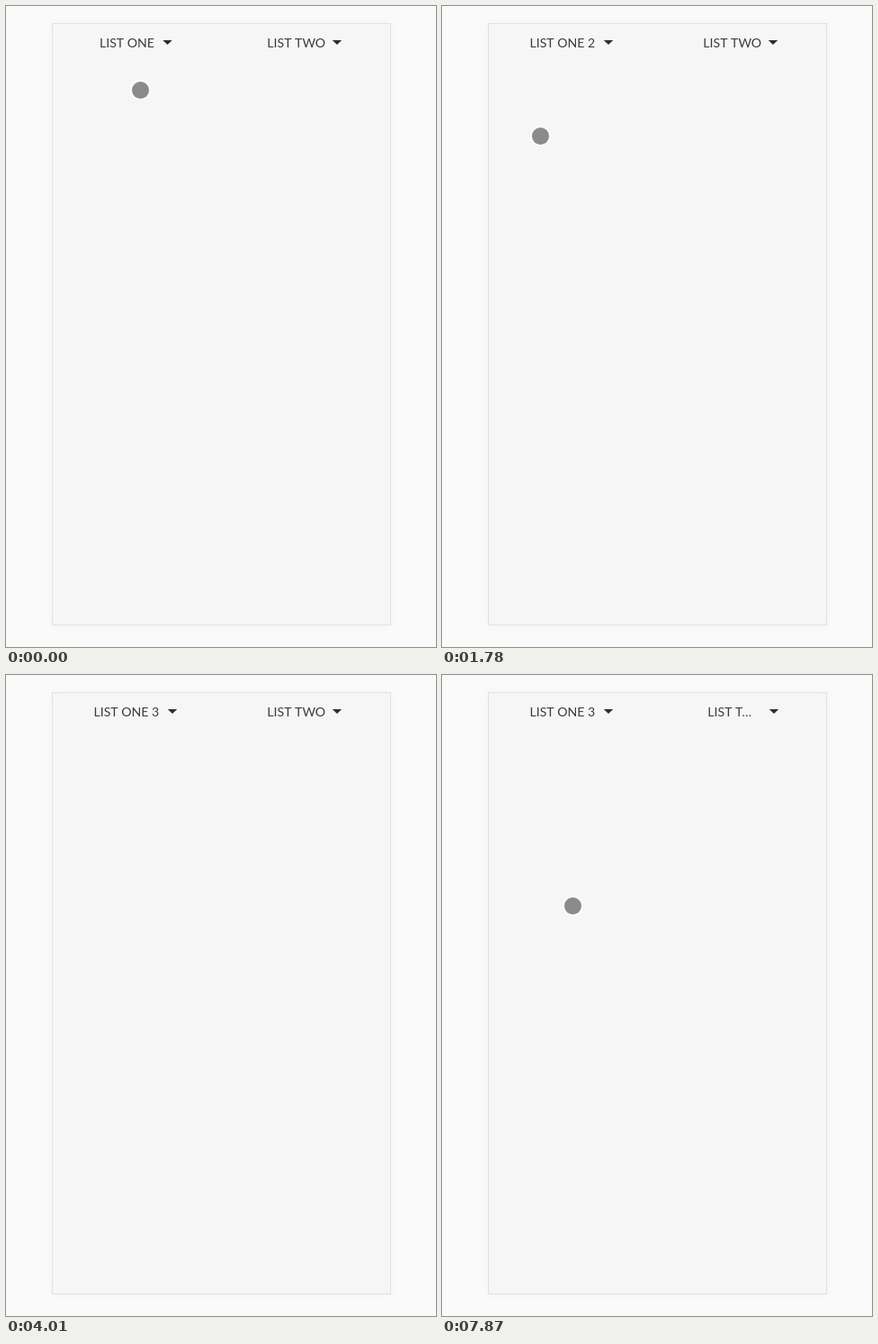
Write an HTML page with a canvas that moves like this. It is 478 by 712 pixels and loops after 8000 ms.

```html
<!DOCTYPE html>
<html lang="en">
<head>
<meta charset="utf-8">
<title>Dropdown menu</title>
<style>
  html, body { margin: 0; width: 100%; height: 100%; overflow: hidden; background: #fafafa; }
  canvas { display: block; }
</style>
</head>
<body>
<canvas id="stage" width="478" height="712"></canvas>
<script>
const ctx = document.getElementById('stage').getContext('2d');
const LOOP = 8000;
const RED = '#f3695c', INK = '#3c3c3c', ARROW = '#2f2f2f';
const FONT = '14.1px Lato, sans-serif';
const CJK = '14px "Noto Sans CJK SC", "Noto Sans CJK", sans-serif';
const PANEL = { x: 52, y: 20, w: 375, h: 667 };
const ROW = 55, LIST_TOP = 62;

// Header captions: [start, text, text x, arrow x]
const captions = [
  [[0, 'LIST ONE', 104, 179.5], [1780, 'LIST ONE 2', 97.5, 185], [3710, 'LIST ONE 3', 97.5, 185]],
  [[0, 'LIST TWO', 290.3, 368], [7870, 'LIST T…', 295.3, 369]]
];

const menus = [
  { from: 740, to: 1780, tab: 0, name: 'LIST ONE', picked: 1, tip: 146 },
  { from: 2660, to: 3710, tab: 0, name: 'LIST ONE', picked: 2, tip: 146 },
  { from: 6990, to: 7870, tab: 1, name: 'LIST TWO', picked: 2, tip: 333 }
];

// Pointer moves: [first step, last step, steps, x, y]
const moves = [
  [0, 0, 1, 149.5, 93.5],
  [150, 590, 4, 155.5, 39.5],
  [1190, 1630, 4, 109.5, 144.5],
  [1930, 2210, 3, 150, 62],
  [2360, 2510, 2, 155.5, 45.5],
  [2810, 3260, 4, 168, 186],
  [3410, 3560, 2, 170, 192],
  [3860, 3860, 1, 171, 165],
  [6110, 6110, 1, 300, 6],
  [6260, 6260, 1, 389, 195],
  [6400, 6690, 3, 309.5, 38.5],
  [7130, 7720, 5, 145.5, 256.5]
];
const hidden = t => t >= 4010 && t < 6110;

function pointerAt(t) {
  let x = 0, y = 0;
  for (const [first, last, steps, tx, ty] of moves) {
    if (t < first) break;
    const gap = (last - first) / Math.max(1, steps - 1);
    const done = gap ? Math.min(steps, Math.floor((t - first) / gap + 1e-6) + 1) : steps;
    const p = done / steps, k = p * p * (3 - 2 * p);
    x += (tx - x) * k;
    y += (ty - y) * k;
  }
  return { x, y };
}

function rect(x, y, w, h, color) {
  ctx.fillStyle = color;
  ctx.fillRect(x, y, w, h);
}

function text(str, x, y, color, font = FONT, align = 'left') {
  ctx.font = font;
  ctx.textAlign = align;
  ctx.fillStyle = color;
  ctx.fillText(str, x, y);
}

function triangle(x, base, half, height, color) {
  ctx.fillStyle = color;
  ctx.beginPath();
  ctx.moveTo(x - half, base);
  ctx.lineTo(x + half, base);
  ctx.lineTo(x, base + height);
  ctx.fill();
}

function disc(x, y, r, color) {
  ctx.fillStyle = color;
  ctx.beginPath();
  ctx.arc(x, y, r, 0, Math.PI * 2);
  ctx.fill();
}

function drawPanel() {
  const { x, y, w, h } = PANEL;
  rect(0, 0, 478, 712, '#fafafa');
  ctx.save();
  ctx.shadowColor = 'rgba(0,0,0,.03)';
  ctx.shadowBlur = 10;
  rect(x - 1, y - 1, w + 2, h + 2, '#e1e1e1');
  ctx.restore();
  rect(x, y, w, h, '#f6f6f6');
}

function drawMenu(menu) {
  const { x, y, w, h } = PANEL;
  rect(x, y, w, h, '#7a7a7a');
  rect(x, y, w, LIST_TOP - y, '#f4f4f4');
  rect(x, LIST_TOP, w, ROW * 5, '#fefefe');
  triangle(menu.tip, LIST_TOP, 7, -6.5, '#fefefe');
  for (let i = 1; i <= 5; i++) {
    const top = LIST_TOP + (i - 1) * ROW;
    const on = i === menu.picked;
    if (i < 5) rect(x, top + ROW - 1, w, 1, '#f4f4f4');
    text(`${menu.name} ${i}`, 67.2, top + 32, on ? RED : INK);
    if (on) text('选中', 411, top + 32, RED, CJK, 'right');
  }
}

function drawHeader(t, menu) {
  captions.forEach((states, tab) => {
    const [, label, x, arrow] = states.filter(s => t >= s[0]).pop();
    const on = menu && menu.tab === tab;
    text(label, x, 46, on ? RED : INK);
    triangle(arrow, on ? 43 : 38, 5.2, on ? -5 : 5, on ? RED : ARROW);
  });
}

function drawPointer(t) {
  if (hidden(t)) return;
  const { x, y } = pointerAt(t);
  ctx.strokeStyle = 'rgba(255,255,255,.6)';
  ctx.lineWidth = 2;
  ctx.beginPath();
  ctx.arc(x, y, 10.5, 0, Math.PI * 2);
  ctx.stroke();
  disc(x, y, 9.5, 'rgba(40,40,40,.52)');
}

function draw(t) {
  const menu = menus.find(m => t >= m.from && t < m.to);
  drawPanel();
  if (menu) drawMenu(menu);
  drawHeader(t, menu);
  drawPointer(t);
}

const start = performance.now();
function tick() {
  draw((performance.now() - start) % LOOP);
  requestAnimationFrame(tick);
}
tick();
</script>
</body>
</html>
```
